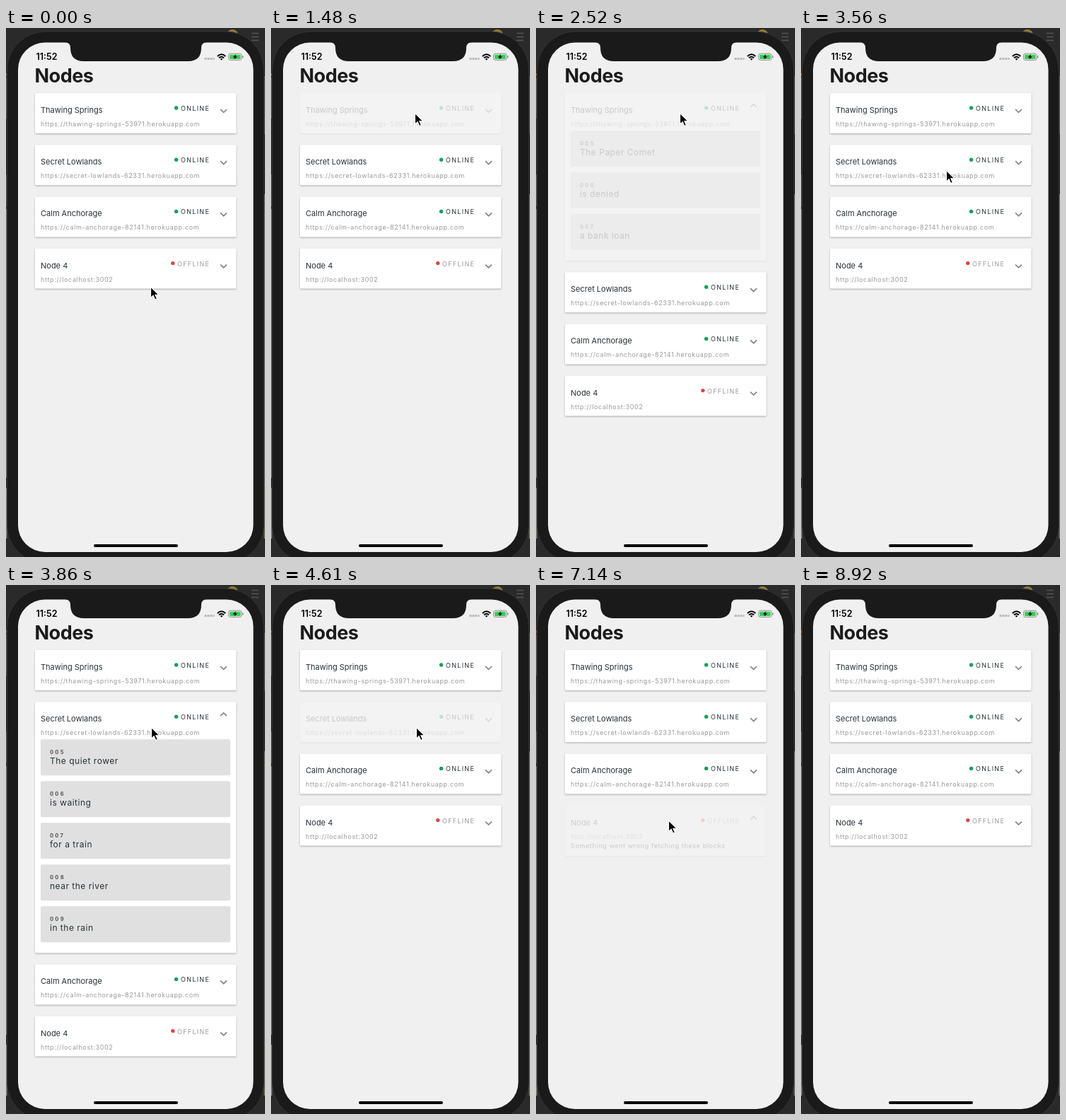
An HTML page that plays this animation: 366x748 px, repeating every 9.22 s.

```html
<!DOCTYPE html>
<html lang="en">
<head>
<meta charset="utf-8">
<title>Nodes</title>
<style>
  html, body { margin: 0; width: 100%; height: 100%; overflow: hidden; background: #2a2a2b; }
  svg { display: block; width: 366px; height: 748px; font-family: Inter, sans-serif; }
  .time { font-size: 12.5px; font-weight: 600; }
  .title { font-size: 27px; font-weight: 700; letter-spacing: -.5px; fill: #1b1b1b; }
  .panel { fill: #fff; filter: drop-shadow(0 1.2px 1.2px rgba(0, 0, 0, .3)); }
  .name { font-size: 11px; fill: #263238; }
  .small { font-size: 9px; letter-spacing: .63px; fill: #999; }
  .status { font-size: 9px; letter-spacing: 1.3px; }
  .chevron { fill: none; stroke: #858585; stroke-width: 1.7; }
  .block { fill: #e0e0e0; }
  .id { font-size: 7.5px; font-weight: 700; letter-spacing: 2.3px; fill: #555; }
  .data { font-size: 12px; letter-spacing: .5px; fill: #263238; }
</style>
</head>
<body>
<svg viewBox="0 0 366 748">
  <!-- desktop behind the phone -->
  <rect width="366" height="748" fill="#2a2a2b"/>
  <circle cx="320" cy="10" r="8" fill="#8f7a38"/>
  <path d="M347 7.5h10M347 12.5h10M347 17.5h10" stroke="#555" stroke-width="1.4"/>
  <path d="M0 66h2" stroke="#a55a2a" stroke-width="3"/>
  <path d="M.7 70V128M.7 207V252M365.3 68V150" stroke="#55565a" stroke-width="1.5"/>
  <path d="M.7 256V636M365.3 235V722" stroke="#77776c" stroke-width="1.5"/>
  <path d="M.7 650V722" stroke="#888" stroke-width="1.5"/>

  <!-- phone -->
  <rect x="1.5" y="5" width="363" height="752" rx="54" fill="#1a1a1b" stroke="#363637"/>
  <rect x="17" y="20.5" width="332.5" height="720.5" rx="38" fill="#f0f0f0"/>
  <path d="M83 20H284Q276 20.5 276 28Q276 47 257 47H110Q91 47 91 28Q91 20.5 83 20Z" fill="#1a1a1b"/>
  <rect x="124" y="730" width="119" height="4" rx="2"/>

  <!-- status bar -->
  <text class="time" x="42.5" y="45">11:52</text>
  <path d="M280.5 43.5h14" stroke="#b9b9b9" stroke-width="3" stroke-dasharray="3 1"/>
  <g fill="none" stroke="#000" stroke-width="2">
    <path d="M298.8 40Q304.5 34.6 310.2 40M301 42.3Q304.5 39.2 308 42.3"/>
    <path d="M302.6 43.6Q304.5 42.3 306.4 43.6L304.5 45.8Z" fill="#000" stroke="none"/>
  </g>
  <rect x="314.5" y="36.2" width="18.5" height="9.2" rx="2.6" fill="none" stroke="#8f8f8f"/>
  <rect x="316" y="37.7" width="15.5" height="6.2" rx="1.2" fill="#35ce5a"/>
  <path d="M334.6 39.2v3.2" stroke="#8f8f8f" stroke-width="1.4"/>
  <path d="M325 37L320.5 41.4H323.3L322.4 44.6L327 40.2H324.2Z"/>

  <text class="title" x="40.5" y="77">Nodes</text>
  <g id="cards"></g>
  <path id="cursor" d="M0 0V15.5L3.6 12.2L6.2 18L8.8 16.9L6.3 11.2H11.2Z" stroke="#fff" stroke-width="1.1"/>
</svg>
<script>
const LOOP = 9220, TOP = 92, PITCH = 73.2, HEIGHT = 57;

// states: [start ms, open, opacity]
const nodes = [
  { name: 'Thawing Springs', url: 'https://thawing-springs-53971.herokuapp.com', online: true, firstId: 5,
    blocks: ['The Paper Comet', 'is denied', 'a bank loan'],
    states: [[0, 0, 1], [1330, 0, .6], [1480, 0, .2], [1630, 1, .55], [1770, 1, .93], [1920, 1, 1],
             [2520, 1, .2], [2670, 0, .55], [2820, 0, .93], [2960, 0, 1]] },
  { name: 'Secret Lowlands', url: 'https://secret-lowlands-62331.herokuapp.com', online: true, firstId: 5,
    blocks: ['The quiet rower', 'is waiting', 'for a train', 'near the river', 'in the rain'],
    states: [[0, 0, 1], [3710, 1, .5], [3860, 1, 1], [4610, 0, .2], [4760, 0, 1]] },
  { name: 'Calm Anchorage', url: 'https://calm-anchorage-82141.herokuapp.com', online: true,
    states: [[0, 0, 1]] },
  { name: 'Node 4', url: 'http://localhost:3002', online: false,
    error: 'Something went wrong fetching these blocks',
    states: [[0, 0, 1], [6240, 0, .3], [6390, 1, .5], [6540, 1, 1],
             [7140, 1, .17], [7290, 0, .5], [7430, 0, .9], [7580, 0, 1]] },
];

// [start ms, x, y]
const pointer = [
  [0, 204.5, 366], [300, 262, 262], [440, 286, 173], [740, 270, 150], [890, 235, 127], [1040, 203.5, 120.5],
  [3110, 204, 140], [3260, 205, 168], [3410, 205, 190], [3560, 205.5, 201.5],
  [5650, 203, 228], [5800, 192, 310], [5940, 187.5, 333],
  [8030, 187, 360], [8180, 188, 440], [8330, 190, 520], [8480, 197, 600],
  [8620, 225, 640], [8770, 260, 700], [8920, 300, 780],
];

const text = (cls, x, y, value, style = '') =>
  `<text class="${cls}" x="${x}" y="${y}" style="${style}">${value}</text>`;

function blockMarkup(label, id, i) {
  const y = 53 + i * 59;
  return `<rect class="block" x="49" y="${y}" width="268" height="51" rx="2"/>` +
    text('id', 62, y + 21, String(id).padStart(3, '0')) + text('data', 62, y + 35, label);
}

function cardMarkup({ name, url, online, blocks = [], firstId, error }) {
  const details = error
    ? text('small', 49, 60.5, error, 'fill:#111')
    : blocks.map((label, i) => blockMarkup(label, firstId + i, i)).join('');
  return `<g>
    <rect class="panel" x="41" width="284.5" height="${HEIGHT}" rx="1.5"/>
    ${text('name', 49, 28, name)}${text('small', 49, 47, url)}
    <circle cx="${online ? 240.6 : 235.8}" cy="21" r="2.7" fill="${online ? '#1b9e5a' : '#dc4545'}"/>
    ${text('status', online ? 247 : 242, 25, online ? 'ONLINE' : 'OFFLINE', `fill:${online ? '#263238' : '#999'}`)}
    <path class="chevron"/>
    <g class="details">${details}</g>
  </g>`;
}

const cards = document.getElementById('cards');
const cursor = document.getElementById('cursor');
cards.innerHTML = nodes.map(cardMarkup).join('');
nodes.forEach((node, i) => {
  const group = cards.children[i];
  node.group = group;
  node.panel = group.querySelector('.panel');
  node.chevron = group.querySelector('.chevron');
  node.details = group.querySelector('.details');
  node.growth = node.error ? 14.5 : node.blocks ? node.blocks.length * 59 + 3 : 0;
});

const current = (steps, t) => steps.findLast(step => step[0] <= t);

function draw(t) {
  let shift = 0;
  nodes.forEach((node, i) => {
    const [, open, opacity] = current(node.states, t);
    const extra = open ? node.growth : 0;
    node.group.setAttribute('transform', `translate(0 ${TOP + i * PITCH + shift})`);
    node.group.setAttribute('opacity', opacity);
    node.panel.setAttribute('height', HEIGHT + extra);
    node.chevron.setAttribute('d', open ? 'M303 20L307.5 15.7L312 20' : 'M303 23L307.5 27.3L312 23');
    node.details.setAttribute('visibility', open ? 'visible' : 'hidden');
    shift += extra;
  });
  const [, x, y] = current(pointer, t);
  cursor.setAttribute('transform', `translate(${x} ${y})`);
}

const start = performance.now();
function tick() {
  draw((performance.now() - start) % LOOP);
  requestAnimationFrame(tick);
}
tick();
</script>
</body>
</html>
```
